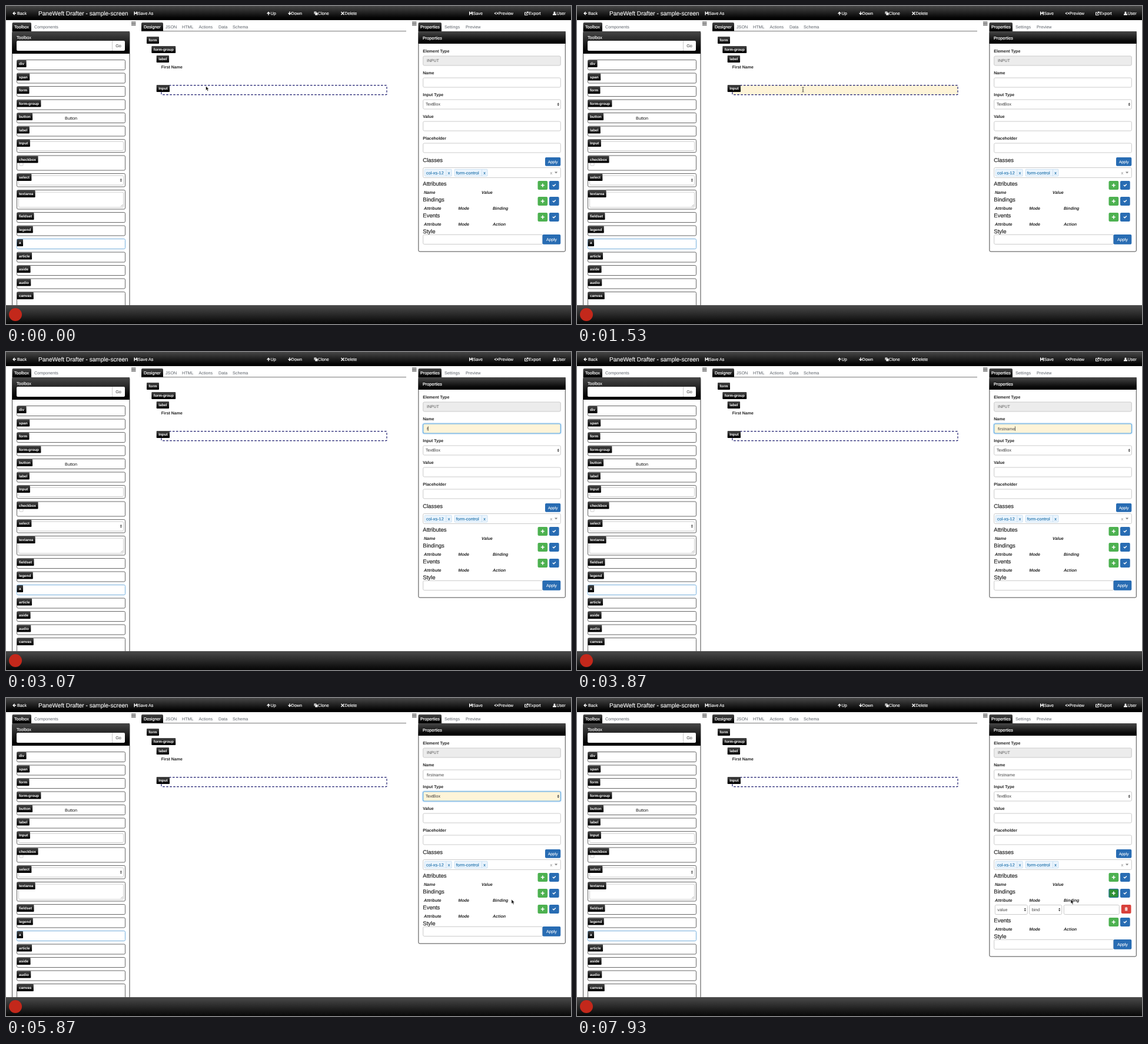
Animation of 960 by 540 pixels, one loop 8 s. Source, as an HTML page:

```html
<!DOCTYPE html>
<html lang="en">
<head>
<meta charset="utf-8">
<title>Screen designer</title>
<style>
  html, body { margin: 0; width: 100%; height: 100%; overflow: hidden; background: #fff; }
  svg { display: block; }
  text { font-family: "Liberation Sans", Arial, sans-serif; text-rendering: geometricPrecision; white-space: pre; }
  .focus { fill: #fef4d8; stroke: #66afe9; stroke-width: 1.2; filter: drop-shadow(0 0 1.6px rgba(102,175,233,.8)); }
  .tip { filter: drop-shadow(0 2px 2.5px rgba(0,0,0,.55)); }
</style>
</head>
<body>
<svg id="stage" width="960" height="540" viewBox="0 0 960 540">
  <defs>
    <linearGradient id="dark" x2="0" y2="1">
      <stop offset="0" stop-color="#474747"/><stop offset=".85" stop-color="#030303"/>
    </linearGradient>
    <linearGradient id="foot" x2="0" y2="1">
      <stop offset="0" stop-color="#4b4b4b"/><stop offset="1" stop-color="#060606"/>
    </linearGradient>
  </defs>
</svg>
<script>
(() => {
const stage = document.getElementById('stage');
const DARK = 'url(#dark)', GREEN = '#4db150', BLUE = '#286cb3', RED = '#d8403b';
const ROW_H = 22;

const icons = {
  back: 'M6 2.3v1.4H2.8l1.3 1.3-.9.9L.1 3 3.2.1l.9.9-1.3 1.3z',
  up: 'M2.3 6h1.4V2.8L5 4.1l.9-.9L3 .1.1 3.2l.9.9 1.3-1.3z',
  down: 'M2.3 0h1.4v3.2L5 1.9l.9.9L3 5.9.1 2.8l.9-.9 1.3 1.3z',
  save: 'M0 0h5l1 1v5H0zM1.5 0v1.9h2.4V0zM1.3 3.7V6h3.4V3.7z',
  clone: 'M0 0h4v1.2H1.2V4H0zM1.8 1.8H6V6H1.8z',
  remove: 'M1 0l2 2 2-2 1 1-2 2 2 2-1 1-2-2-2 2-1-1 2-2-2-2z',
  eye: 'M0 3Q3.5-1.2 7 3 3.5 7.2 0 3zM3.5 1.6a1.4 1.4 0 1 0 .01 0z',
  send: 'M0 1h3v1H1v3.2h3.6V4h1v2.2H0zM3.4 0h3.1v3L5.4 2 3 4.2l-.8-.8 2.3-2.3z',
  user: 'M3 0a1.6 1.7 0 1 1-.01 0zM0 6V5Q.2 3.6 1.6 3.3h2.8Q5.8 3.6 6 5v1z',
  plus: 'M2.2 0h1.6v2.2H6v1.6H3.8V6H2.2V3.8H0V2.2h2.2z',
  check: 'M0 3l1-1 1.3 1.3L5 .6l1 1-3.7 3.7z',
  trash: 'M0 .7h1.6V0h1.8v.7H5v.8H0zM.5 2h4v4h-4zM1.6 2.6v2.8h.4V2.6zM3 2.6v2.8h.4V2.6z',
  sort: 'M0 2.2L1.7 0l1.7 2.2zM0 3.4h3.4L1.7 5.6z',
  bars: 'M0 0h7.5v1H0zM0 1.9h7.5v1H0zM0 3.8h7.5v1H0zM0 5.7h7.5v1H0z'
};

function el(tag, attrs, parent = stage) {
  const node = document.createElementNS('http://www.w3.org/2000/svg', tag);
  for (const k in attrs) node.setAttribute(k, attrs[k]);
  return parent.appendChild(node);
}
const group = () => el('g', {});

function box(x, y, width, height, fill, stroke = 'none', more = {}, parent) {
  return el('rect', { x, y, width, height, fill, stroke, rx: 2, ...more }, parent);
}

// y is the middle of the capital letters
function text(x, y, str, { size = 7.2, fill = '#333', bold, italic, thick = 0, anchor = 'start' } = {}, parent) {
  const node = el('text', {
    x, y: y + size * 0.355, fill, 'font-size': size, 'text-anchor': anchor,
    'font-weight': bold ? 700 : 400, 'font-style': italic ? 'italic' : 'normal',
    stroke: thick ? fill : 'none', 'stroke-width': thick
  }, parent);
  node.textContent = str;
  return node;
}

const icon = (name, x, y, fill = '#fff', parent) =>
  el('path', { d: icons[name], transform: `translate(${x} ${y})`, fill, 'fill-rule': 'evenodd' }, parent);

function tag(x, y, name) {
  const back = box(x, y, 10, 12, DARK, 'none', { rx: 1 });
  const label = text(x + 3.5, y + 6, name, { size: 6.3, bold: true, fill: '#fff' });
  back.setAttribute('width', label.getComputedTextLength() + 7);
}

function tabs(x, width, names) {
  el('path', { d: `M${x} 43V30q0-2 2-2h${width - 4}q2 0 2 2v13z`, fill: DARK });
  names.forEach(([tx, name], i) =>
    text(tx, 35.5, name, i ? { fill: '#5a6068' } : { fill: '#fff', thick: 0.2 }));
}

const field = (x, y, w, h, parent, fill = '#fff') =>
  box(x, y, w, h, fill, '#c6c6c6', { 'stroke-width': 0.9 }, parent);

const button = (x, y, w, h, fill, parent) => box(x, y, w, h, fill, 'none', {}, parent);

/* top bar */
box(0, 0, 960, 24, DARK, 'none', { rx: 0 });
text(55, 12.5, 'PaneWeft Drafter - sample-screen', { size: 10.08, fill: '#fff', thick: 0.12 });
for (const [name, ix, tx, label] of [
  ['back', 11, 19, 'Back'], ['save', 217.5, 224, 'Save As'], ['up', 443, 449.5, 'Up'],
  ['down', 479, 484.5, 'Down'], ['clone', 523.5, 530, 'Clone'], ['remove', 569, 575.5, 'Delete'],
  ['save', 787, 793.5, 'Save'], ['eye', 829.5, 836.5, 'Preview'], ['send', 881, 888, 'Export'],
  ['user', 929, 935.5, 'User']
]) {
  icon(name, ix, 9.5);
  text(tx, 12.5, label, { fill: '#fff', thick: 0.15 });
}
icon('bars', 213, 26.5, '#444');
icon('bars', 690, 26.5, '#444');

/* toolbox */
tabs(10.5, 32.5, [[14, 'Toolbox'], [48, 'Components']]);
box(10.5, 43.5, 199.5, 490, '#fff', '#333', { 'stroke-width': 0.9 });
box(10.5, 43, 199.5, 38, DARK, 'none', { rx: 0 });
text(18, 53.5, 'Toolbox', { fill: '#fff', thick: 0.15 });
box(18, 59, 184, 17, '#fff');
el('path', { d: 'M180.5 59v17', stroke: '#bbb', 'stroke-width': 0.8 });
text(191, 67.5, 'Go', { anchor: 'middle' });

const heights = { Input: 22, checkbox: 25, select: 22.5, textarea: 32.5, canvas: 40 };
let itemY = 91.5;
for (const name of ['div', 'span', 'form', 'form-group', 'button', 'label', 'Input', 'checkbox', 'select',
  'textarea', 'fieldset', 'legend', 'a', 'article', 'aside', 'audio', 'canvas']) {
  const h = heights[name] || 17;
  box(18.5, itemY, 184, h, '#fff', name === 'a' ? '#66a5d8' : '#555', { 'stroke-width': 0.9 });
  if (/Input|select|textarea/.test(name)) field(21.5, itemY + 3.5, 178, h - 6.5);
  if (name === 'button') text(110.5, itemY + 8.7, 'Button', { fill: '#111', anchor: 'middle' });
  if (name === 'checkbox') box(23, itemY + 11, 6, 6, '#fff', '#bbb', { rx: 1, 'stroke-width': 0.7 });
  if (name === 'select') icon('sort', 193.7, itemY + 8.5, '#333');
  if (name === 'textarea') {
    el('path', { d: `M195 ${itemY + 28}l3.5-3.5M197 ${itemY + 28}l1.5-1.5`, stroke: '#888', 'stroke-width': 0.6 });
  }
  tag(18.5, itemY + 0.5, name);
  itemY += h + 5.5;
}

/* footer */
box(0, 508, 960, 32, 'url(#foot)', 'none', { rx: 0 });
el('circle', { cx: 16, cy: 524, r: 11, fill: '#c3281b' });

/* designer */
tabs(230, 37, [[234, 'Designer'], [271, 'JSON'], [299, 'HTML'], [327.5, 'Actions'], [361, 'Data'], [385, 'Schema']]);
el('path', { d: 'M230 42.7h450', stroke: '#666', 'stroke-width': 0.9 });
const slot = box(264, 134.6, 383, 16, '#fff', '#1b1b6e', { rx: 1, 'stroke-width': 1.2, 'stroke-dasharray': '3.6 2.4' });
tag(239, 52, 'form');
tag(247.3, 68, 'form-group');
tag(255.7, 84, 'label');
text(263.7, 104, 'First Name', { size: 7, bold: true, fill: '#222' });
tag(255.7, 134, 'Input');

/* properties */
tabs(700.5, 39.5, [[704, 'Properties'], [745, 'Settings'], [781, 'Preview']]);
const panel = box(700.9, 43.5, 249.4, 373.5, '#fff', '#333', { 'stroke-width': 0.9 });
box(700.5, 43, 250.3, 21, DARK, 'none', { rx: 0 });
text(708, 54, 'Properties', { fill: '#fff', thick: 0.2 });

['Element Type', 'Name', 'Input Type', 'Value', 'Placeholder'].forEach((label, i) => {
  text(708.3, 77 + 37 * i, label, { size: 7, bold: true, fill: '#222' });
  field(708.7, 85 + 37 * i, 233.6, 16, stage, i ? '#fff' : '#ececec');
});
const focusRing = y => box(708.7, y, 233.6, 16, '', '', { class: 'focus' });
const nameFocus = focusRing(122), typeFocus = focusRing(159);
text(715, 93, 'INPUT', { size: 6.9, fill: '#555' });
text(713, 167, 'TextBox', { size: 7 });
icon('sort', 936.6, 164.2, '#333');
const nameText = text(715, 130, '', { size: 7.1, fill: '#444' });
const caret = el('path', { d: 'M0 126.3v7.6', stroke: '#222', 'stroke-width': 0.7 });

const heading = (y, str, parent) => text(708.3, y, str, { size: 9.5, fill: '#2b2b2b', thick: 0.22 }, parent);

// heading row with add and confirm buttons; returns the add button
function section(y, str, cols, parent) {
  heading(y, str, parent);
  const add = button(903.5, y - 5, 16.7, 15, GREEN, parent);
  icon('plus', 908.8, y - 0.5, '#fff', parent);
  button(923, y - 5, 16.7, 15, BLUE, parent);
  icon('check', 928.4, y - 0.5, '#fff', parent);
  for (const [x, col] of cols) {
    text(x, y + 14.5, col, { size: 7.1, bold: true, italic: true, fill: '#222' }, parent);
  }
  return add;
}

heading(262, 'Classes');
button(916, 257, 26.3, 14.7, BLUE);
text(929.2, 264.3, 'Apply', { size: 6.6, fill: '#fff', anchor: 'middle', thick: 0.1 });
field(708.7, 274.5, 233.6, 17);
for (const [x, w, str] of [[711.3, 46, 'col-xs-12'], [762, 56, 'form-control']]) {
  const ink = { size: 7.3, fill: '#1a6ea9', thick: 0.1 };
  box(x, 277.3, w, 11.7, '#eaf4fd', '#c3dcf0', { rx: 1, 'stroke-width': 0.8 });
  el('path', { d: `M${x + w - 9.5} 277.5v11.3`, stroke: '#c3dcf0', 'stroke-width': 0.8 });
  text(x + 2.8, 283, str, ink);
  text(x + w - 4.8, 283, 'x', { ...ink, anchor: 'middle' });
}
text(926.3, 283, 'x', { size: 7.5, fill: '#888', anchor: 'middle' });
el('path', { d: 'M932 281.6h5.2l-2.6 2.8z', fill: '#888' });

section(302, 'Attributes', [[710, 'Name'], [808, 'Value']]);
const addBinding = section(329, 'Bindings', [[710, 'Attribute'], [768.5, 'Mode'], [827, 'Binding']]);
const addRing = box(904, 324.5, 15.7, 14, 'none', '#1b63c4', { rx: 1.5, 'stroke-dasharray': '1.2 .8', 'stroke-width': 1.3 });

const row = group();
for (const [x, str] of [[710.3, 'value'], [768.7, 'bind']]) {
  field(x, 351.5, 55, 16, row);
  text(x + 4, 359.3, str, { fill: '#444' }, row);
  icon('sort', x + 49.3, 356.6, '#333', row);
}
field(827.3, 351.5, 94, 16, row);
button(924.8, 351, 16.7, 15, RED, row);
icon('trash', 930.7, 355.3, '#fff', row);

const lower = group();
section(356, 'Events', [[710, 'Attribute'], [768.5, 'Mode'], [827, 'Action']], lower);
heading(383, 'Style', lower);
field(708.7, 388.3, 203, 16.2, lower);
button(911.5, 388, 30.8, 16.8, BLUE, lower);
text(926.9, 396.3, 'Apply', { fill: '#fff', anchor: 'middle', thick: 0.1 }, lower);

const tip = group();
box(904.5, 348, 34.7, 10, '#e6e6e6', '#c4c4c4', { rx: 1.5, 'stroke-width': 0.5, class: 'tip' }, tip);
text(921.9, 353.1, 'Properties', { size: 5.95, fill: '#222', anchor: 'middle' }, tip);

/* pointers, each with its hot spot at 0,0 */
const shapes = { arrow: group(), beam: group(), hand: group() };
el('path', {
  d: 'M0 0v7.2l1.6-1.5 1.3 2.8 1.3-.6L3 5.2h2.2z', fill: '#111', stroke: '#fff', 'stroke-width': 0.5
}, shapes.arrow);
el('path', {
  d: 'M-1.6-4Q0-4 0-3 0-4 1.6-4M0-3v6M-1.6 4Q0 4 0 3 0 4 1.6 4M-.8.8h1.6', fill: 'none', stroke: '#333', 'stroke-width': 0.8
}, shapes.beam);
el('path', {
  d: 'M.3 1Q.4-.1 1.4.7L2.2 3l3 .6q1 .4.8 1.6L5.5 8.4H2.3L-.4 5.6Q-.4 4.7.5 4.9L1.3 5.4z',
  fill: '#fff', stroke: '#111', 'stroke-width': 0.8
}, shapes.hand);

// time, x, y
const track = [
  [0, 339.5, 136], [900, 339.5, 136], [930, 342, 137], [1200, 381, 141.5], [1270, 384, 142],
  [1650, 384, 142], [1730, 399, 142], [1867, 457, 142], [2000, 550, 139.5], [2133, 596, 137],
  [4867, 614.5, 155.5], [5000, 652, 190], [5133, 733, 275], [5267, 769, 311],
  [5467, 769, 311], [5600, 782, 318], [5933, 878, 348], [6133, 904.5, 355], [6333, 905, 340],
  [6530, 905.3, 338.6], [7733, 905.3, 338.6], [7933, 839, 342]
];
const pointers = [[0, 'arrow'], [930, 'beam'], [2730, ''], [4860, 'arrow'], [6530, 'hand'], [7800, 'arrow']];
const typing = [[0, ''], [2730, 'f'], [3070, 'fi'], [3130, 'fir'], [3270, 'firs'],
  [3600, 'first'], [3666, 'firstn'], [3800, 'firstnam'], [3866, 'firstname']];

const latest = (list, t) => list.filter(e => e[0] <= t).pop()[1];
const between = (t, a, b) => t >= a && t < b;
const ramp = (t, at) => Math.min(1, Math.max(0, (t - at + 67) / 200));
const show = (node, on) => node.setAttribute('visibility', on ? 'visible' : 'hidden');

function position(t) {
  const i = track.findIndex(p => p[0] > t);
  if (i < 0) return track[track.length - 1].slice(1);
  const [t0, x0, y0] = track[i - 1], [t1, x1, y1] = track[i];
  const k = (t - t0) / (t1 - t0);
  return [x0 + (x1 - x0) * k, y0 + (y1 - y0) * k];
}

function render(t) {
  const [x, y] = position(t), pointer = latest(pointers, t);
  for (const name in shapes) {
    show(shapes[name], name === pointer);
    shapes[name].setAttribute('transform', `translate(${x} ${y})`);
  }

  slot.setAttribute('fill', between(t, 1530, 1598) ? '#fef4d8' : '#fff');
  nameFocus.setAttribute('opacity', t < 1598 ? 0 : t < 4198 ? 1 : 1 - ramp(t, 4200));
  typeFocus.setAttribute('opacity', t < 4198 ? 0 : t < 7398 ? ramp(t, 4200) : 1 - ramp(t, 7400));

  nameText.textContent = latest(typing, t);
  const end = 715.3 + nameText.getComputedTextLength();
  caret.setAttribute('transform', `translate(${end} 0)`);
  show(caret, between(t, 1598, 2065) || between(t, 2530, 4198));

  const added = t >= 7398;
  show(row, added);
  show(addRing, added);
  lower.setAttribute('transform', `translate(0 ${added ? ROW_H : 0})`);
  panel.setAttribute('height', 373.5 + (added ? ROW_H : 0));
  addBinding.setAttribute('fill', t < 6665 ? GREEN : '#2f9133');
  tip.setAttribute('opacity', added || t < 6665 ? 0 : ramp(t, 6670));
}

// the screen refreshes fifteen times a second
const LOOP = 8000, TICK = 1000 / 15, start = performance.now();
function loop() {
  const now = (performance.now() - start + 5) % LOOP;
  render(Math.floor(now / TICK) * TICK);
  requestAnimationFrame(loop);
}
loop();
})();
</script>
</body>
</html>
```
